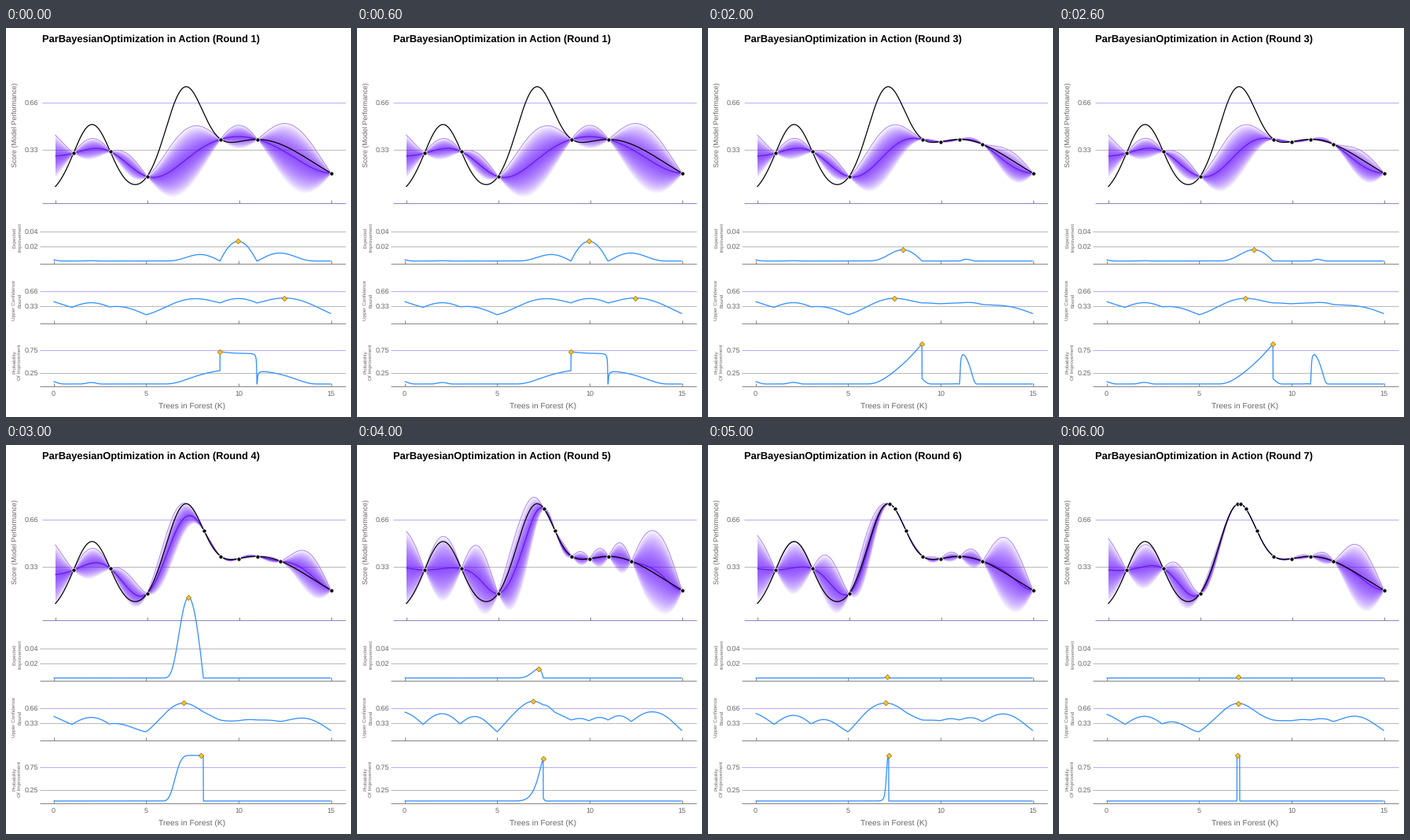
A matplotlib script that plays this animation: 439 by 495 pixels, repeating every 7 s.

```python
import math
import numpy as np
import matplotlib.pyplot as plt
from matplotlib.animation import FuncAnimation

W, H, DPI = 439, 495, 64
PX = 72 / DPI  # points per pixel
plt.rcParams["font.family"] = "Liberation Sans"
plt.rcParams["text.hinting"] = "none"

GREY, LAVENDER, AXIS = "#b8b8b8", "#b8adf2", "#858585"
TEXT, VIOLET, BLUE, GOLD = "#666666", "#6a12ff", "#3390ff", "#ffc81e"
KAPPA, LAYERS = 2, 20

START = [1, 3, 5, 9, 11, 15]
TRIED = [9.96, 12.25, 8.1, 7.5, 7.2, 7.02]
# length scale, deviation and mean of the process in each round
PRIORS = [(1.55, 0.14, 0.30)] * 3 + [(1.5, 0.19, 0.30), (0.8, 0.145, 0.33),
                                     (0.95, 0.143, 0.33), (1.1, 0.15, 0.32)]

grid = np.linspace(0, 15, 3001)
cdf = np.vectorize(lambda u: 0.5 * (1 + math.erf(u / math.sqrt(2))))


def bell(x, centre, width):
    return np.exp(-((x - centre) / width) ** 2 / 2)


def score(x):
    return 0.5 * bell(x, 2, 1) + 0.6 * bell(x, 7, 1) + 0.4 * bell(x, 11, 3)


def predict(known, length, sigma, mu):
    """Gaussian process mean and deviation along the grid."""
    cov = bell(known[:, None], known, length) + 1e-9 * np.eye(len(known))
    cross = bell(known[:, None], grid, length)
    weights = np.linalg.solve(cov, cross)
    mean = mu + (score(known) - mu) @ weights
    var = 1 - np.sum(cross * weights, axis=0)
    return mean, sigma * np.sqrt(np.maximum(var, 1e-10))


def study(i):
    known = np.array(sorted(START + TRIED[:i]))
    mean, sd = predict(known, *PRIORS[i])
    gain = mean - score(known).max()
    u = gain / sd
    poi = cdf(u)
    ei = gain * poi + sd * np.exp(-u**2 / 2) / math.sqrt(2 * math.pi)
    return known, mean, sd, (ei, mean + KAPPA * sd, poi)


rounds = [study(i) for i in range(len(PRIORS))]

fig = plt.figure(figsize=(W / DPI, H / DPI), dpi=DPI, facecolor="white")
ax = fig.add_axes([0, 0, 1, 1])
ax.set_xlim(0.5, W + 0.5)
ax.set_ylim(H + 0.5, 0.5)
ax.axis("off")


def line(x, y, color, width=1, z=1):
    return ax.plot(x, y, color=color, lw=width * PX, zorder=z,
                   solid_capstyle="butt")[0]


def label(x, y, text, size, color=TEXT, **kw):
    kw = {"ha": "center", "va": "center", **kw}
    return ax.text(x, y, text, fontsize=size * PX, color=color, **kw)


class Panel:
    """Maps values to pixels and draws the panel's rules and axis."""

    def __init__(self, left, axis_y, zero, scale, marks, edge=43,
                 axis_color=AXIS):
        self.left, self.zero, self.scale = left, zero, scale
        for value, color in marks:
            y = round(self.y(value))
            line([edge, 432], [y, y], color)
            label(41.5, y + 0.5, f"{value:.2f}", 9, ha="right",
                  va="center_baseline")
        line([edge, 432], [axis_y, axis_y], axis_color)
        for x in self.x(np.arange(0, 16, 5)):
            line([x, x], [axis_y - 4, axis_y], AXIS)

    def x(self, value):
        return self.left + value * (414 - self.left) / 15

    def y(self, value):
        return self.zero - value * self.scale


top = Panel(63, 223, 215, 181.8, [(0.66, LAVENDER), (0.33, GREY)], 46,
            "#8f86bd")
lower = [Panel(61, 300, 297, 950, [(0.04, GREY), (0.02, GREY)]),
         Panel(61, 376, 373.5, 57.6, [(0.66, LAVENDER), (0.33, GREY)]),
         Panel(61, 456, 453.5, 58, [(0.75, LAVENDER), (0.25, GREY)])]

label(12, 124, "Score (Model Performance)", 8.7, rotation=90)
for y, first, second in [(267, "Expected", "Improvement"),
                         (347, "Upper Confidence", "Bound"),
                         (426, "Probability", "Of Improvement")]:
    label(11, y, first, 6.4, rotation=90)
    label(18, y, second, 6.4, rotation=90)
for value in range(0, 16, 5):
    label(lower[0].x(value), 466.5, str(value), 9)
label(237.5, 482, "Trees in Forest (K)", 10.2)
title = label(46, 19, "", 12.9, "black", weight="bold", ha="left",
              va="baseline")

top_x = top.x(grid)
line(top_x, top.y(score(grid)), "black", 1.25, 5)
live = []


def draw(i):
    while live:
        live.pop().remove()
    known, mean, sd, curves = rounds[i]
    title.set_text(f"ParBayesianOptimization in Action (Round {i + 1})")
    for reach in np.linspace(0, KAPPA, LAYERS + 1)[1:]:
        live.append(ax.fill_between(top_x, top.y(mean - reach * sd),
                                    top.y(mean + reach * sd), color=VIOLET,
                                    alpha=0.06, lw=0, zorder=2))
    live.append(line(top_x, top.y(mean + KAPPA * sd), "#a67cf5", 0.9, 3))
    live.append(line(top_x, top.y(mean), "#6316e6", 1.1, 4))
    live.extend(ax.plot(top.x(known), top.y(score(known)), "o", ms=5.2 * PX,
                        mfc="black", mec="white", mew=0.8 * PX, zorder=6))
    for panel, curve in zip(lower, curves):
        best = curve.argmax()
        live.append(line(panel.x(grid), panel.y(curve), BLUE, 1.3, 4))
        live.extend(ax.plot(panel.x(grid[best]), panel.y(curve[best]), "D",
                            ms=4.6 * PX, mfc=GOLD, mec="#a87420",
                            mew=0.8 * PX, zorder=6))
    return [title, *live]


anim = FuncAnimation(fig, draw, frames=len(rounds), interval=1000,
                     repeat=True, repeat_delay=0, blit=False)
plt.show()
```
